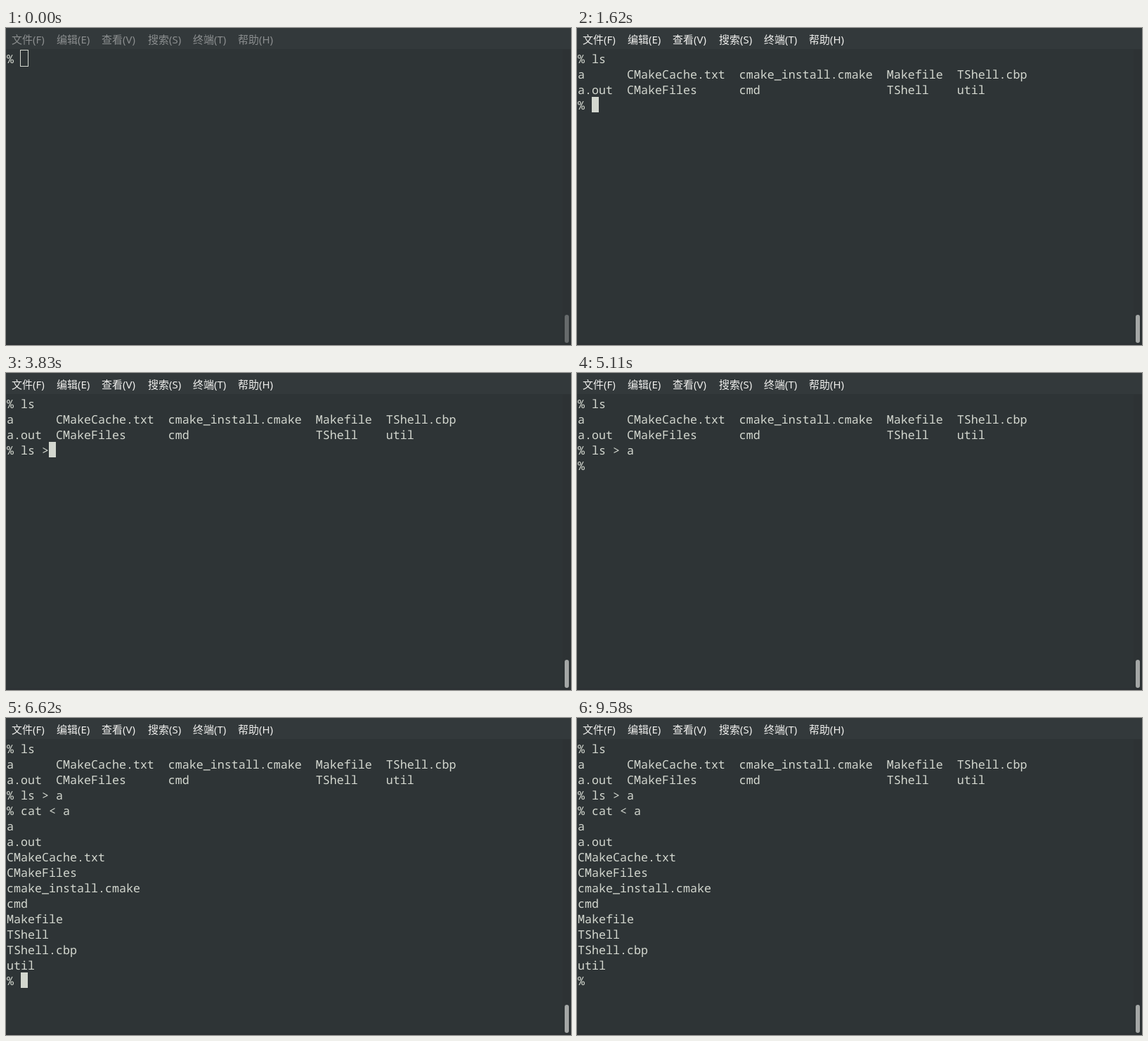
An HTML page for the animation above (9820 ms loop, 804 px wide and 451 px high).

```html
<!DOCTYPE html>
<html lang="zh-CN">
<head>
<meta charset="utf-8">
<title>终端</title>
<style>
  html, body { margin: 0; width: 100%; height: 100%; overflow: hidden; background: #2e3436; }
  svg { display: block; width: 804px; height: 451px; }
  text { white-space: pre; }
  #menu text { font: 15px "Noto Sans", "Noto Sans CJK SC", "Noto Sans CJK", sans-serif; }
  #term text {
    font: 16.6667px "Noto Sans Mono", "DejaVu Sans Mono", monospace;
    font-variant-ligatures: none;
    text-rendering: geometricPrecision;
    fill: #d3d7cf;
  }
</style>
</head>
<body>
<svg viewBox="0 0 804 451">
  <rect width="804" height="451" fill="#2e3436"/>
  <rect width="804" height="30" fill="#33393b"/>
  <rect x="792" y="30" width="12" height="421" fill="#2d3234"/>
  <rect y="449" width="804" height="2" fill="#2c3033"/>
  <g id="menu"></g>
  <rect id="thumb" x="795" y="408" width="6" height="40" rx="3"/>
  <rect id="block" width="10" height="22" fill="#d3d7cf"/>
  <rect id="hollow" x="20.5" y="31.5" width="11" height="23" fill="none" stroke="#d3d7cf"/>
  <g id="term"></g>
  <g id="beam" fill="none" stroke-linecap="square">
    <path id="beamEdge" stroke="#fff" stroke-width="3"/>
    <path id="beamCore" stroke="#000" stroke-width="1"/>
  </g>
</svg>
<script>
const LOOP = 9820, ROW = 22, COL = 10, LEFT = 1, TOP = 32;
const $ = id => document.getElementById(id);

function addText(parent, x, y, str = '') {
  const el = document.createElementNS('http://www.w3.org/2000/svg', 'text');
  el.setAttribute('x', x);
  el.setAttribute('y', y);
  el.textContent = str;
  return parent.appendChild(el);
}

[[8, '文件(F)'], [72, '编辑(E)'], [136, '查看(V)'],
 [202, '搜索(S)'], [266, '终端(T)'], [330, '帮助(H)']]
  .forEach(([x, label]) => addText($('menu'), x, 22, label));

const beamPath = 'M433.5 257.5h1l1 1l1-1h1M435.5 258.5v11M433.5 270.5h1l1-1l1 1h1';
$('beamEdge').setAttribute('d', beamPath);
$('beamCore').setAttribute('d', beamPath);

const listing = [
  'a      CMakeCache.txt  cmake_install.cmake  Makefile  TShell.cbp',
  'a.out  CMakeFiles      cmd                  TShell    util'
];
const files = ['a', 'a.out', 'CMakeCache.txt', 'CMakeFiles', 'cmake_install.cmake',
  'cmd', 'Makefile', 'TShell', 'TShell.cbp', 'util'];

// Each step: time, then keys typed, lines printed, or cursor visibility.
const steps = [
  [1270, 'l'], [1440, 's'], [1580, ['']], [1620, [...listing, '% ']],
  [2180, false], [2780, true],
  [3320, 'l'], [3430, 's'], [3530, ' '], [3830, '>'], [4030, ' '], [4180, 'a'],
  [4540, ['% ']],
  [5110, false], [5160, 'c'], [5350, 'a'], [5590, 't'], [5760, ' '],
  [6100, '<'], [6310, ' '], [6450, 'a'],
  [6620, [...files, '% ']],
  [7190, false], [7790, true], [8390, false], [8980, true], [9580, false]
];

function screenAt(t) {
  const lines = ['% '];
  let cursor = true;
  for (const [at, act] of steps) {
    if (t < at) break;
    cursor = act !== false;
    if (typeof act === 'string') lines[lines.length - 1] += act;
    else if (Array.isArray(act)) {
      // Output replaces an empty fresh line.
      if (lines[lines.length - 1] === '') lines.pop();
      lines.push(...act);
    }
  }
  return { lines, cursor };
}

const rows = Array.from({ length: 15 + 1 }, (_, i) =>
  addText($('term'), LEFT, TOP + 18 + i * ROW));

const mix = (a, b, k) => `rgb(${a.map((v, i) => Math.round(v + (b[i] - v) * k))})`;
const show = (el, on) => el.setAttribute('visibility', on ? 'visible' : 'hidden');

function draw(t) {
  const fade = t < 430 ? 0 : Math.min(9, Math.floor((t - 430) / 41.25) + 1) / 9;
  $('menu').setAttribute('fill', mix([139, 142, 143], [238, 238, 236], fade));
  $('thumb').setAttribute('fill', mix([102, 106, 107], [164, 167, 166], fade));

  const { lines, cursor } = screenAt(t);
  rows.forEach((el, i) => {
    const str = lines[i] || '';
    if (el.textContent !== str) el.textContent = str;
  });

  const focused = t >= 430, last = lines.length - 1;
  $('block').setAttribute('x', LEFT + lines[last].length * COL);
  $('block').setAttribute('y', TOP + last * ROW);
  show($('block'), focused && cursor);
  show($('hollow'), !focused);
  show($('beam'), focused && t < 1270);
}

const start = performance.now();
function tick() {
  draw((performance.now() - start) % LOOP);
  requestAnimationFrame(tick);
}
draw(0);
requestAnimationFrame(tick);
</script>
</body>
</html>
```
